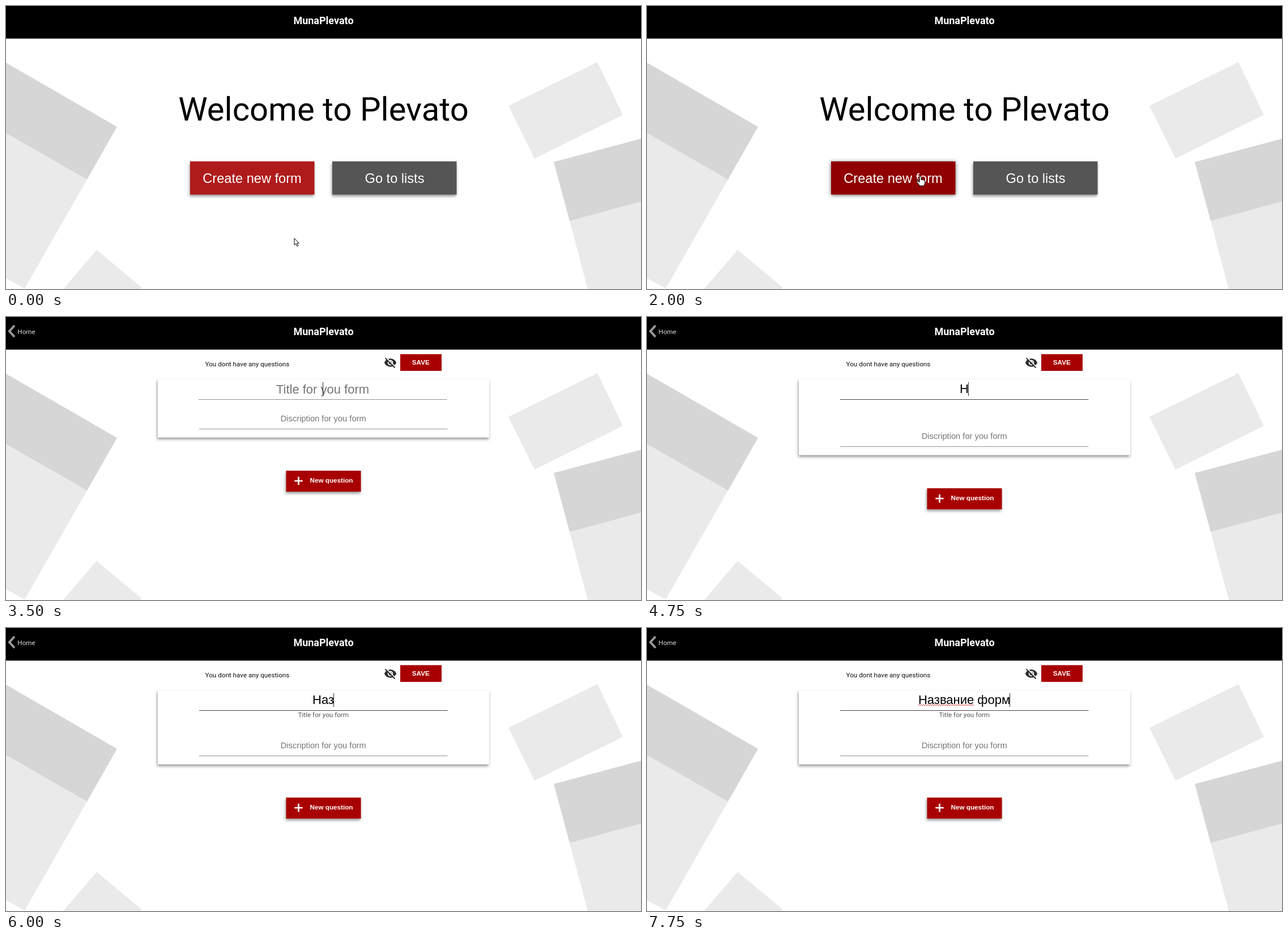
Recreate the animation shown at these times as an HTML page. Size 1121x499 px, loop 8 s.

```html
<!DOCTYPE html>
<html lang="en">
<head>
<meta charset="utf-8">
<title>Form builder</title>
<style>
  html, body { margin: 0; width: 100%; height: 100%; overflow: hidden; background: #fff; }
  svg { position: absolute; left: 0; top: 0; display: block; }
  text { font-family: Roboto, sans-serif; font-size: 11.7px; text-anchor: middle; }
  .start { text-anchor: start; }
  .arial, #field { font-family: "Liberation Sans", Arial, sans-serif; }
  .bold { font-weight: 700; }
  .raised { filter: drop-shadow(-1px 3px 2.5px rgba(0, 0, 0, .42)); }
  .raised.hover { filter: drop-shadow(0 1px 3.5px rgba(0, 0, 0, .6)); }
  #field {
    position: absolute; left: 341px; top: 112px; width: 438px; height: 30px;
    font-size: 22px; line-height: 30px; text-align: center; white-space: pre; color: #000;
  }
  #typed { position: relative; display: inline-block; height: 30px; min-width: 0; vertical-align: top; }
  #caret { position: absolute; left: 100%; top: 3px; width: 1px; height: 24px; margin-left: -1px; background: #222; }
  #wave {
    position: absolute; left: 0; top: 23px; width: 98px; height: 2px;
    background:
      repeating-linear-gradient(90deg, #e04040 0 2px, transparent 2px 4px) 0 0 / 100% 1px no-repeat,
      repeating-linear-gradient(90deg, transparent 0 2px, #e04040 2px 4px) 0 1px / 100% 1px no-repeat;
  }
</style>
</head>
<body>
<svg width="1121" height="499" viewBox="0 0 1121 499">
  <g fill="#eaeaea">
    <path d="M0 224L143 306 33 498 0 480Z"/>
    <path d="M101 499L160 430 239 496 237 499Z"/>
    <path d="M1044 99L1089 192 933 269 887 176Z"/>
    <path d="M995 379L1121 345V499H1027Z"/>
  </g>
  <g fill="#d6d6d6">
    <path d="M0 100L196 213 143 306 0 224Z"/>
    <path d="M967 275L1121 234V345L995 379Z"/>
  </g>
  <rect width="1121" height="57.5"/>
  <text class="bold" x="560.5" y="31.5" fill="#fff" style="font-size:18px">MunaPlevato</text>

  <g id="home">
    <text x="560.5" y="202" style="font-size:58px">Welcome to Plevato</text>
    <rect id="create" class="raised" x="325" y="274" width="219.5" height="58.5"/>
    <rect class="raised" x="576" y="274" width="219.5" height="58.5" fill="#555"/>
    <g fill="#fff">
      <text class="arial" x="434.5" y="311.5" style="font-size:23.6px">Create new form</text>
      <text class="arial" x="686" y="311.5" style="font-size:23.6px">Go to lists</text>
    </g>
  </g>

  <g id="editor">
    <path d="M15 15L6 25 15 35" fill="none" stroke="#999" stroke-width="4"/>
    <text class="start" x="20.3" y="29.5" fill="#ddd">Home</text>
    <text class="start" x="351.5" y="87" fill="#111">You dont have any questions</text>
    <svg x="667" y="69" width="23" height="23" viewBox="0 0 24 24">
      <path fill="#2b2b2b" d="M1 12C2.7 7.6 7 4.5 12 4.5S21.3 7.6 23 12C21.3 16.4 17 19.5 12 19.5S2.7 16.4 1 12Z"/>
      <circle cx="12" cy="12" r="5" fill="#fff"/>
      <circle cx="12" cy="12" r="3" fill="#2b2b2b"/>
      <path d="M4 2.4L21.8 20.2" stroke="#fff" stroke-width="1.9"/>
      <path d="M2.6 3.6L20.4 21.4" stroke="#2b2b2b" stroke-width="1.9"/>
    </svg>
    <rect x="696" y="65.5" width="73" height="29.5" fill="#a80000"/>
    <text class="arial bold" x="732.3" y="83.5" fill="#fff">SAVE</text>

    <rect id="card" class="raised" x="268" y="110" width="585" height="102.5" fill="#fff"/>
    <text id="label" class="arial" x="559" y="134.5" fill="#757575" style="font-size:22px">Title for you form</text>
    <rect id="line" y="145" width="438.5" height="1"/>
    <text id="hint" x="560.3" y="157" fill="#555">Title for you form</text>
    <g id="lower">
      <text class="arial" x="560.2" y="184" fill="#757575" style="font-size:14.7px">Discription for you form</text>
      <rect x="341" y="197" width="438.5" height="1" fill="#949494"/>
      <rect class="raised" x="494.5" y="271" width="132" height="37" fill="#a80000"/>
      <path d="M509.3 289H523.7M516.5 281.8V296.2" stroke="#fff" stroke-width="2.6"/>
      <text class="arial bold" x="574.5" y="292" fill="#fff">New question</text>
    </g>
  </g>
</svg>

<div id="field"><span id="typed"><span id="word"></span><i id="caret"></i><i id="wave"></i></span></div>

<svg width="1121" height="499" viewBox="0 0 1121 499">
  <g id="cursor" fill="#fff" stroke="#000" stroke-linejoin="round">
    <path data-kind="arrow" d="M.5 .5V12.5L3.3 10 5.3 14.5 7.3 13.6 5.3 9.2H8.7Z"/>
    <path data-kind="hand" d="M-1.5 1Q0-1 1.5 1V6L6 7 8 8.5Q9 13 6.5 17H-1L-5.5 10.5Q-5-.0-5 8.5Q-3.5 8-1.5 11Z"/>
    <path data-kind="beam" d="M-3-9H3M0-9V9M-3 9H3" fill="none"/>
  </g>
</svg>

<script>
const LOOP = 8000;
const TITLE = "Название форм";
const $ = id => document.getElementById(id);
const show = (el, on) => { el.style.display = on ? "" : "none"; };

// Each row holds from its time until the next row.
const pointer = [
  [0, "arrow", 508.5, 409], [250, "arrow", 507, 396], [500, "arrow", 503, 370],
  [750, "arrow", 496, 340], [1000, "hand", 489, 312], [1250, "hand", 484, 302],
  [1500, "hand", 482.5, 300], [2250, "arrow", 492, 286], [2500, "arrow", 540, 210],
  [2750, "beam", 556.5, 168], [3000, "beam", 559.5, 127], [3500, "none", 0, 0]
];
const fills = [[0, "#af1b1b"], [1000, "#a01010"], [1250, "#900000"]];
const carets = [[0, 0], [3500, 1], [3750, 0], [4000, 1]];
const lines = [[0, 341, "#949494"], [3000, 340, "#949494"], [4000, 340, "#555"], [4500, 341, "#444"]];
const shifts = [[0, 0], [4500, 31], [5000, 28]];
const letters = [
  [0, 0], [4500, 1], [5500, 2], [6000, 3], [6250, 4], [6500, 6],
  [6750, 8], [7000, 9], [7250, 10], [7500, 11], [7750, 13]
];
const at = (rows, t) => rows.filter(row => row[0] <= t).pop();

function draw(t) {
  const editing = t >= 2250;
  show($("home"), !editing);
  show($("editor"), editing);
  show($("field"), editing);

  $("create").setAttribute("fill", at(fills, t)[1]);
  $("create").classList.toggle("hover", t >= 1000);

  const [, lineX, lineFill] = at(lines, t);
  $("line").setAttribute("x", lineX);
  $("line").setAttribute("fill", lineFill);

  const count = at(letters, t)[1];
  const shift = at(shifts, t)[1];
  $("word").textContent = TITLE.slice(0, count);
  show($("label"), !count);
  show($("hint"), t >= 5000);
  show($("caret"), at(carets, t)[1]);
  show($("wave"), count > 8);
  $("card").setAttribute("height", 102.5 + shift);
  $("lower").setAttribute("transform", `translate(0 ${shift})`);

  const [, kind, x, y] = at(pointer, t);
  $("cursor").setAttribute("transform", `translate(${x} ${y})`);
  for (const shape of $("cursor").children) show(shape, shape.dataset.kind === kind);
}

const began = performance.now();
function tick() {
  draw((performance.now() - began) % LOOP);
  requestAnimationFrame(tick);
}
tick();
</script>
</body>
</html>
```
